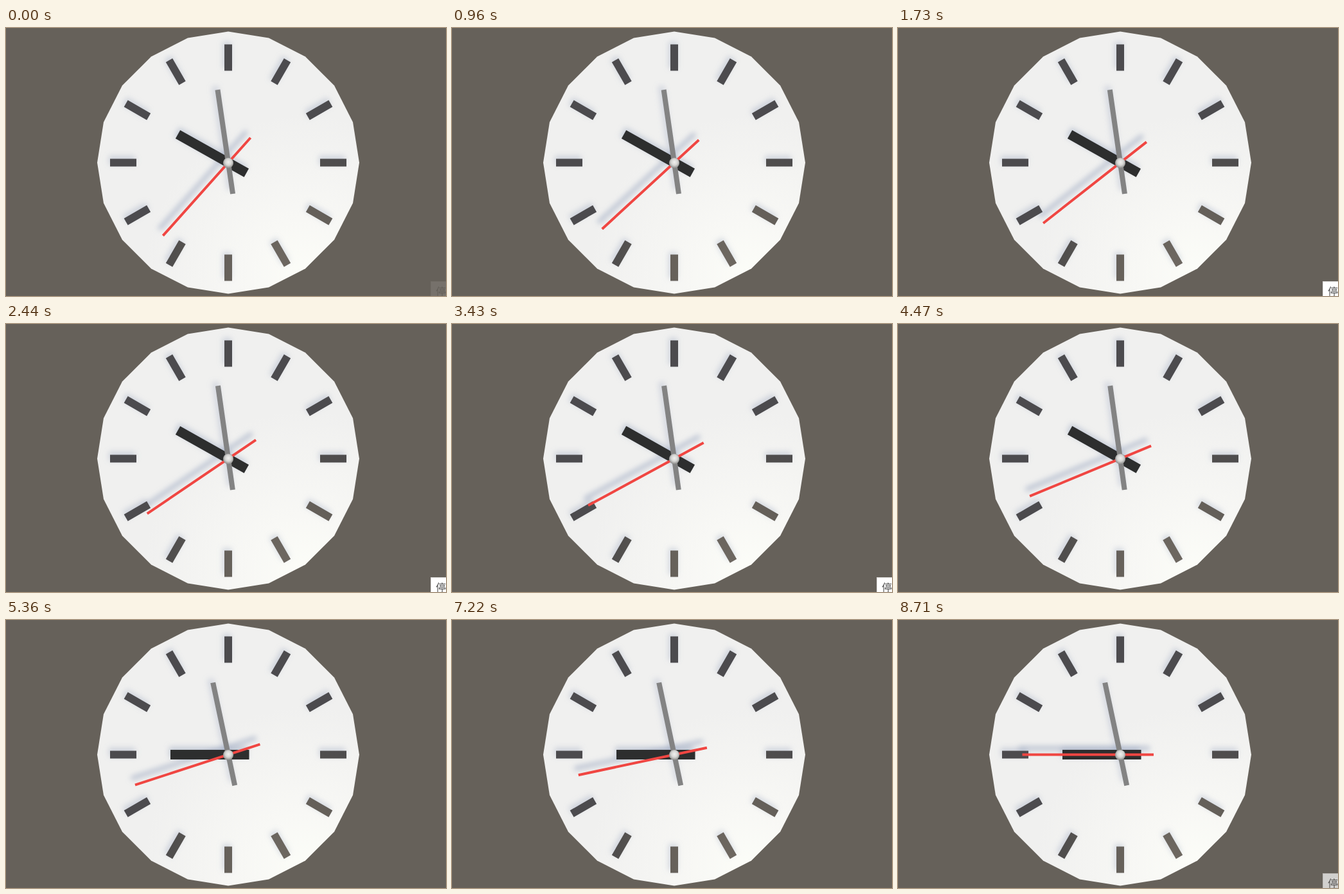
Animation, 685 px wide and 417 px high, one loop 8.78 s. Source, as an HTML page:

```html
<!DOCTYPE html>
<html lang="zh">
<head>
<meta charset="utf-8">
<title>Clock</title>
<style>
  html, body { margin: 0; width: 100%; height: 100%; overflow: hidden; background: #66615a; }
  svg { display: block; }
  text { font: 16px "Noto Sans CJK SC", "Noto Sans CJK", sans-serif; }
</style>
</head>
<body>
<svg width="685" height="417" viewBox="0 0 685 417">
  <defs>
    <radialGradient id="faceFill" gradientUnits="userSpaceOnUse" cx="465" cy="385" r="250">
      <stop offset="0" stop-color="#fcfdf8"/>
      <stop offset=".35" stop-color="#f8f8f5"/>
      <stop offset="1" stop-color="#f0f0ef"/>
    </radialGradient>
    <radialGradient id="markFill" gradientUnits="userSpaceOnUse" cx="425" cy="372" r="220">
      <stop offset="0" stop-color="#6e6861"/>
      <stop offset=".48" stop-color="#645f59"/>
      <stop offset=".75" stop-color="#504e4d"/>
      <stop offset="1" stop-color="#4c4b4e"/>
    </radialGradient>
    <radialGradient id="hubFill" cx=".52" cy=".42" r=".6">
      <stop offset="0" stop-color="#f0f0ee"/>
      <stop offset=".5" stop-color="#d6d6d4"/>
      <stop offset="1" stop-color="#858584"/>
    </radialGradient>
    <filter id="soft" filterUnits="userSpaceOnUse" x="0" y="0" width="685" height="417">
      <feGaussianBlur stdDeviation="4"/>
    </filter>
  </defs>
  <rect width="685" height="417" fill="#66615a"/>
  <polygon id="face" fill="url(#faceFill)"/>
  <g id="shadows" filter="url(#soft)" fill="none" stroke="#8f9dba"></g>
  <g id="parts" fill="none"></g>
  <circle cx="346" cy="210" r="8" fill="url(#hubFill)"/>
  <g id="tip">
    <rect x="661.5" y="394.5" width="60" height="40" fill="#fff" stroke="#d8d6d4"/>
    <text x="669" y="416" fill="#505050">停止</text>
  </g>
</svg>
<script>
const LOOP = 8780, STEP = 69.8, CX = 346, CY = 209.5;
const byId = id => document.getElementById(id);

function polar(deg, r) {
  const a = deg * Math.PI / 180;
  return (CX + r * Math.sin(a)).toFixed(2) + ',' + (CY - r * Math.cos(a)).toFixed(2);
}

const spoke = (deg, from, to) => 'M' + polar(deg, from) + 'L' + polar(deg, to);

function addPath(parent, attrs) {
  const p = document.createElementNS('http://www.w3.org/2000/svg', 'path');
  for (const k in attrs) p.setAttribute(k, attrs[k]);
  byId(parent).appendChild(p);
  return p;
}

// One bar with its cast shadow; returns a function that sets its path.
function bar(color, width, dx, dy, opacity) {
  const shade = addPath('shadows', {
    'stroke-width': width + 2, opacity, transform: `translate(${dx} ${dy})`
  });
  const body = addPath('parts', { stroke: color, 'stroke-width': width });
  return d => [shade, body].forEach(p => p.setAttribute('d', d));
}

byId('face').setAttribute('points',
  Array.from({ length: 20 }, (_, i) => polar(i * 18, 204)).join(' '));

bar('url(#markFill)', 12, -2, -4, .34)(
  Array.from({ length: 12 }, (_, i) => spoke(i * 30, 143, 184)).join(''));

function hand(color, width, tail, tip, ...shadow) {
  const set = bar(color, width, ...shadow);
  return deg => set(spoke(deg, -tail, tip));
}

const hour = hand('#2d2e2e', 15, 32.5, 90, -2, -4, .42);
const minute = hand('#838383', 8, 49, 114.5, -4, -6, .3);
const second = hand('#f04642', 4, 52, 152.5, -6, -10, .62);

const TOGGLE = 4870, TICKS = [5290, 6320, 7350, 8420];

function setClock(t) {
  if (t < TOGGLE) {
    // smooth running
    const n = Math.floor(t / STEP + .25);
    const sec = 221.8 + 5.75 * n * STEP / 1000;
    const min = 348 + sec / 60;
    second(sec);
    minute(min);
    hour(270 + min / 12);
  } else {
    // whole units only
    second(246 + 6 * TICKS.filter(k => t >= k).length);
    minute(348);
    hour(270);
  }
}

function tipOpacity(t) {
  if (t < 960) return .1;
  if (t >= 8710) return .7;
  if (t >= 8640) return .35;
  const ramp = start => Math.max(0, Math.min(1, (t - start) / 140));
  return ramp(1380) - ramp(4060);
}

function draw(now) {
  const t = now % LOOP;
  setClock(t);
  byId('tip').setAttribute('opacity', tipOpacity(t));
}

const start = performance.now();
function frame() {
  draw(performance.now() - start);
  requestAnimationFrame(frame);
}
frame();
</script>
</body>
</html>
```
